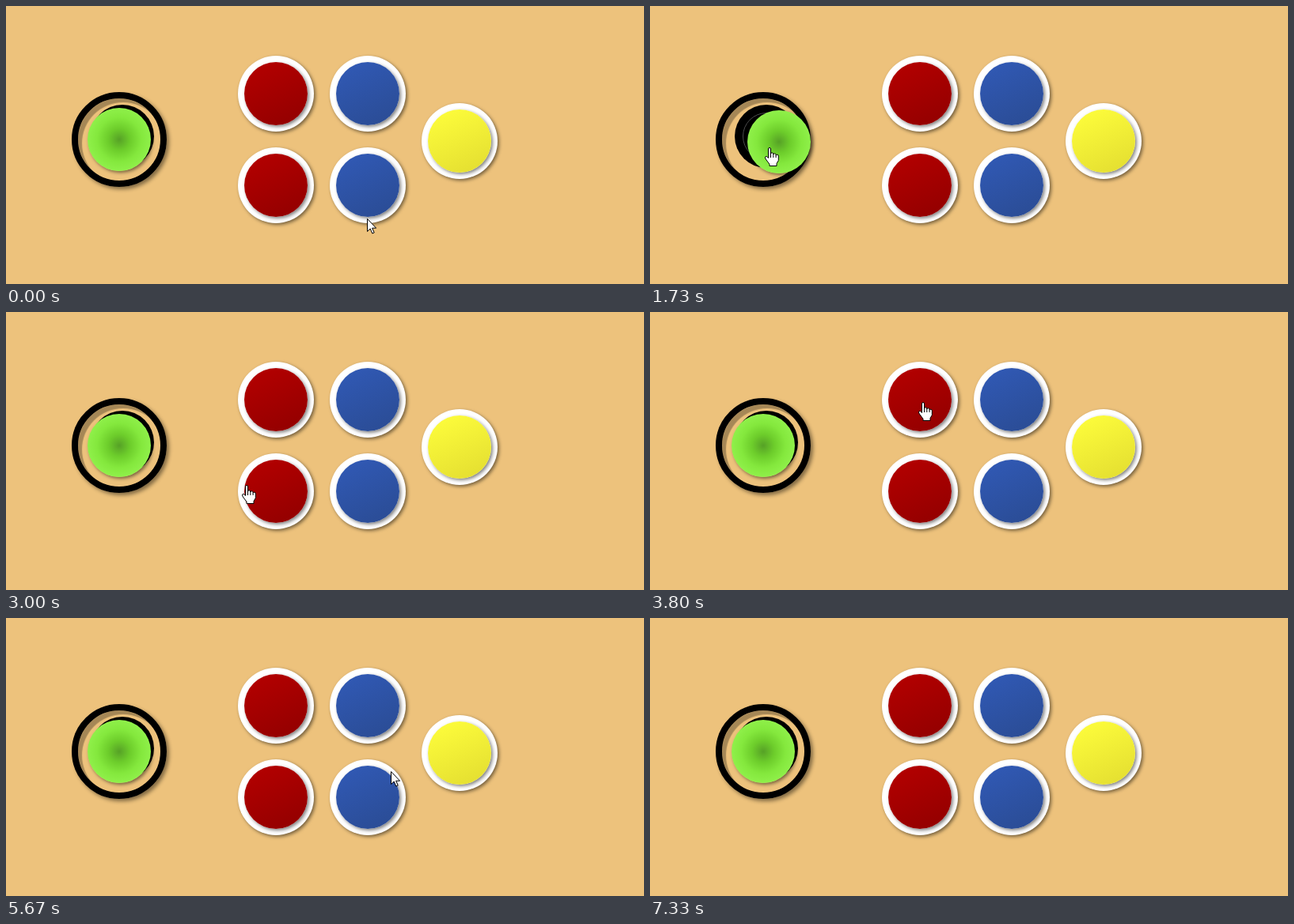
Recreate the animation shown at these times as an HTML page. Size 806 px wide and 352 px high, loop 7590 ms.

```html
<!DOCTYPE html>
<html lang="en">
<head>
<meta charset="utf-8">
<title>Arcade controls</title>
<style>
  html, body { margin: 0; width: 100%; height: 100%; overflow: hidden; background: #edc27c; }
  #stage { position: absolute; left: 0; top: 0; width: 806px; height: 352px; overflow: hidden; }
  #stage div { position: absolute; box-sizing: border-box; border-radius: 50%; }

  .base {
    left: 83px; top: 109px; width: 120px; height: 120px; border: 8px solid #000;
    box-shadow: 3px 3px 5px rgba(0,0,0,.45), inset 5px 5px 1px rgba(0,0,0,.3);
  }
  .stem { left: 107px; top: 125px; width: 80px; height: 80px; background: #000; }
  .stem::after {
    content: ""; position: absolute; inset: 10px; border-radius: 50%;
    border: 1px solid #4c4c4c;
  }
  .ball {
    left: 103px; top: 129px; width: 80px; height: 80px;
    background: radial-gradient(circle closest-side, #56a126, #6dcd2b 35%, #84e83d 70%, #8ff04a);
    box-shadow: 2px 2px 4px rgba(0,0,0,.5);
  }
  .ring {
    width: 96px; height: 96px; margin: -48px; background: #fff;
    box-shadow: 2px 2px 4px rgba(0,0,0,.5);
  }
  .cap {
    left: 8px; top: 8px; width: 80px; height: 80px;
    background: linear-gradient(155deg, var(--light), var(--dark));
    box-shadow: 2px 2px 4px rgba(0,0,0,.5);
  }
  .down .cap {
    background: linear-gradient(155deg, var(--dark), var(--light) 60%);
    box-shadow: inset 2px 2px 4px rgba(0,0,0,.4);
  }
  .red { --light: #b60000; --dark: #900000; }
  .blue { --light: #315ab7; --dark: #2a4b92; }
  .yellow { --light: #ffff3c; --dark: #e2dc30; }

  svg { position: absolute; left: 0; top: 0; overflow: visible; }
  svg path { fill: #fff; stroke: #000; stroke-width: 1; stroke-linejoin: round; }
  svg .lines { fill: none; }
</style>
</head>
<body>
<div id="stage">
  <div class="base"></div>
  <div class="stem"></div>
  <div class="ball"></div>
  <svg id="cursor" width="1" height="1">
    <path id="arrow" d="M.5 .5V16.5L4.2 13 6.8 19 9.2 18 6.6 12.2H11.6Z"/>
    <g id="hand">
      <path d="M-1.5 13.5V2Q-1.5 .5 0 .5T1.5 2V8Q1.7 6.8 3.2 6.8T4.8 8.3V9Q5 7.8 6.5 7.8T8.1 9.4V10.2Q8.4 9.2 9.8 9.2T11.3 11V16.5L9 20.5V23.5H0V21.3L-4.7 15Q-6.3 12.6 -5 11.7T-2.8 12.3Z"/>
      <path class="lines" d="M1.5 7.5V13M4.8 8.5V13M8.1 9.7V13"/>
    </g>
  </svg>
</div>
<script>
const LOOP = 7590, FPS = 15;
const HOME = [143, 169];
const DRAG_START = 11, SPIN_START = 26, DRAG_END = 41, EXIT = 110;

const byId = id => document.getElementById(id);
const stage = byId('stage'), cursor = byId('cursor'), arrow = byId('arrow'), hand = byId('hand');
const ball = document.querySelector('.ball');

// Each button: colour, centre, and the steps at which it is held down
const buttons = [
  ['red', 341, 111, [59]],
  ['blue', 457, 111, [76]],
  ['red', 341, 227, [49, 53, 82, 95]],
  ['blue', 457, 227, []],
  ['yellow', 573, 171, [67, 72, 87, 103]]
].map(([color, x, y, presses]) => {
  const el = document.createElement('div');
  el.className = 'ring ' + color;
  el.style.left = x + 'px';
  el.style.top = y + 'px';
  el.innerHTML = '<div class="cap"></div>';
  stage.insertBefore(el, cursor);
  return { el, x, y, presses };
});

// Pointer stops outside the drag: step, x, y
const route = [
  [0, 456, 269], [3, 322, 226], [7, 152, 178], [10, 146, 178],
  [40, 136, 195], [42, 190, 202], [46, 342, 224], [54, 342, 224],
  [57, 345, 114], [60, 345, 114], [64, 553, 168], [73, 553, 168],
  [74, 463, 107], [77, 463, 107], [80, 347, 222], [83, 347, 222],
  [86, 555, 180], [88, 555, 180], [92, 324, 249], [96, 324, 249],
  [101, 583, 175], [104, 583, 175], [107, 320, 265], [110, 60, 352]
];

const polar = (deg, rx, ry) => {
  const a = deg * Math.PI / 180;
  return [rx * Math.cos(a), ry * Math.sin(a)];
};

function swing(n) {
  const a = (n - 11.7) / 8.2 * 2 * Math.PI;
  return [-29 * Math.sin(a), 1 + 2 * Math.sin(a)];
}

function ballOffset(n) {
  if (n <= DRAG_START || n > DRAG_END + 1) return [0, 0];
  if (n < SPIN_START - 1) return swing(n);
  const m = n - SPIN_START;
  const bulge = 5 * Math.abs(Math.sin(m * Math.PI / 11));
  const fade = n > DRAG_END ? .4 : 1;
  return polar(15 + 45 * m, (20.7 - .41 * m + bulge) * fade, (11.6 - .145 * m + bulge) * fade);
}

function pointerAt(n) {
  if (n >= DRAG_START && n < SPIN_START) {
    const [x, y] = swing(n + 1);
    return [HOME[0] + 2 + x * .9, HOME[1] + 9 + y];
  }
  if (n >= SPIN_START && n < DRAG_END - 1) {
    const m = n - SPIN_START, r = 13 + m;
    const [x, y] = polar(51 + 55.36 * m, r, r);
    return [HOME[0] + x, HOME[1] + y];
  }
  const i = Math.max(1, route.findIndex(p => p[0] >= n));
  const [n0, x0, y0] = route[i - 1], [n1, x1, y1] = route[i];
  const k = (n - n0) / (n1 - n0);
  return [x0 + (x1 - x0) * k, y0 + (y1 - y0) * k];
}

function draw(n) {
  const [bx, by] = ballOffset(n);
  ball.style.transform = `translate(${Math.round(bx)}px, ${Math.round(by)}px)`;
  for (const b of buttons) b.el.classList.toggle('down', b.presses.includes(n));

  cursor.style.display = n < EXIT ? '' : 'none';
  if (n >= EXIT) return;
  const [x, y] = pointerAt(n).map(Math.round);
  const over = (cx, cy) => Math.hypot(x - cx, y - cy) < 40;
  const dragging = n >= DRAG_START && n < DRAG_END;
  const pointing = dragging || over(HOME[0] + bx, HOME[1] + by) || buttons.some(b => over(b.x, b.y));
  cursor.style.transform = `translate(${x}px, ${y}px)`;
  hand.style.display = pointing ? '' : 'none';
  arrow.style.display = pointing ? 'none' : '';
}

const start = performance.now();
function tick() {
  const t = (performance.now() - start) % LOOP;
  draw(Math.floor((t + 4) * FPS / 1000));
  requestAnimationFrame(tick);
}
tick();
</script>
</body>
</html>
```
